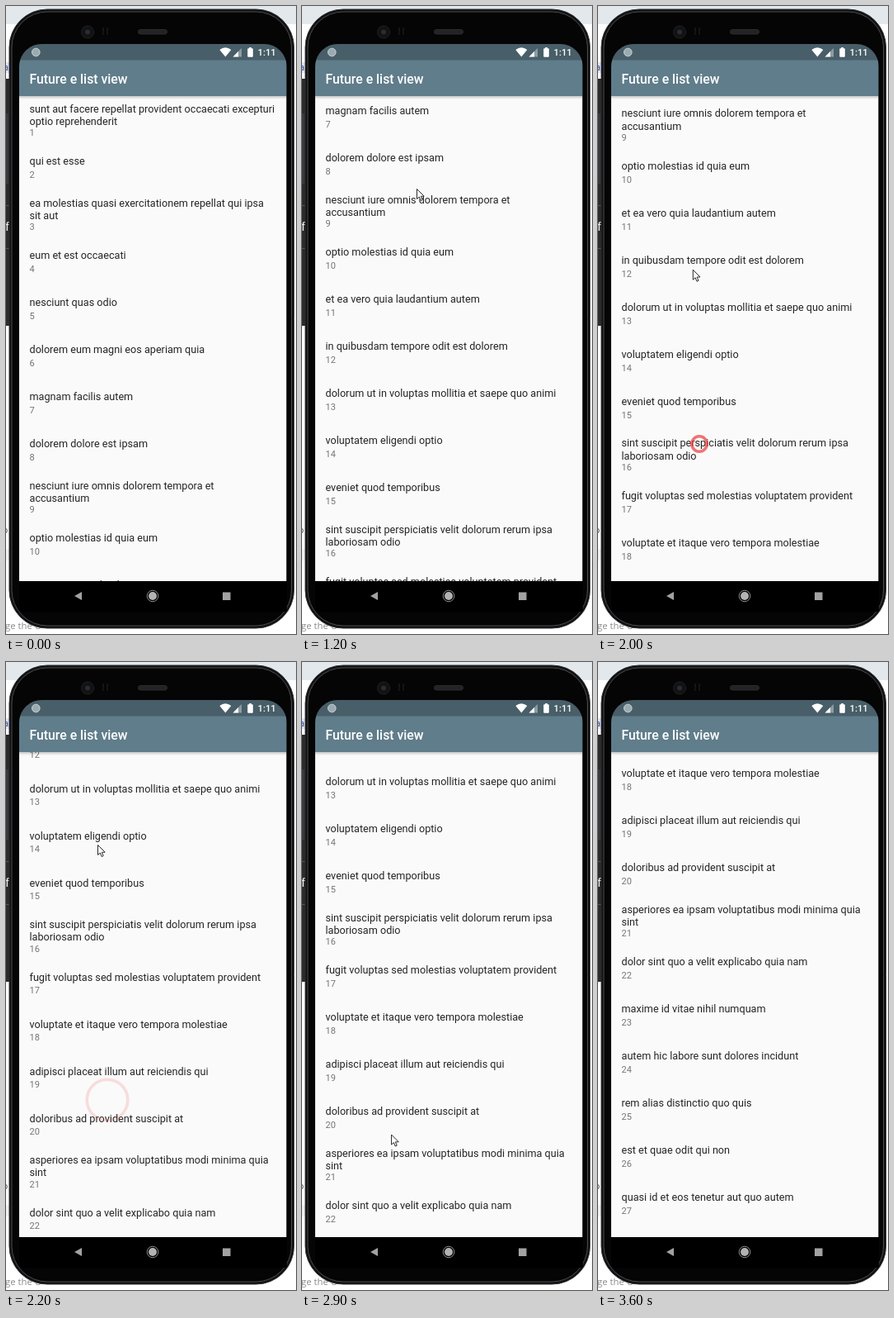
These frames come from a looping animation (352 px wide and 760 px high, 4600 ms). An HTML page with a canvas:

```html
<!DOCTYPE html>
<html lang="en">
<head>
<meta charset="utf-8">
<title>Future list view</title>
<style>
html, body { margin: 0; width: 100%; height: 100%; overflow: hidden; background: #fff; }
canvas { display: block; width: 352px; height: 760px; }
</style>
</head>
<body>
<canvas id="stage"></canvas>
<script>
const W = 352, H = 760, LOOP = 4600, STEP = 100, ENTER = 300, LEAVE = 3600;
const SCREEN = { x: 16, y: 46, list: 109, right: 340.7, bottom: 696, radius: 27 };
const ROW = 57, SCROLL_TIME = 330;
const TITLES = `sunt aut facere repellat provident occaecati excepturi|optio reprehenderit
qui est esse
ea molestias quasi exercitationem repellat qui ipsa|sit aut
eum et est occaecati
nesciunt quas odio
dolorem eum magni eos aperiam quia
magnam facilis autem
dolorem dolore est ipsam
nesciunt iure omnis dolorem tempora et|accusantium
optio molestias id quia eum
et ea vero quia laudantium autem
in quibusdam tempore odit est dolorem
dolorum ut in voluptas mollitia et saepe quo animi
voluptatem eligendi optio
eveniet quod temporibus
sint suscipit perspiciatis velit dolorum rerum ipsa|laboriosam odio
fugit voluptas sed molestias voluptatem provident
voluptate et itaque vero tempora molestiae
adipisci placeat illum aut reiciendis qui
doloribus ad provident suscipit at
asperiores ea ipsam voluptatibus modi minima quia|sint
dolor sint quo a velit explicabo quia nam
maxime id vitae nihil numquam
autem hic labore sunt dolores incidunt
rem alias distinctio quo quis
est et quae odit qui non
quasi id et eos tenetur aut quo autem`.split('\n').map(s => s.split('|'));

// The list follows each press with a short lag
const SWIPES = [
  { press: 700, x: 124, y: 570, scrollAt: 850, distance: 346 },
  { press: 1900, x: 123, y: 530, scrollAt: 1873, distance: 315.5 },
  { press: 2940, x: 108, y: 573, scrollAt: 2867, distance: 303.5 },
];
const MOVES = [
  { from: 300, to: 700, x: 124, y: 570 },
  { from: 800, to: 1180, x: 139, y: 221 },
  { from: 1200, to: 1400, x: 131, y: 690 },
  { from: 1400, to: 1800, x: 123, y: 530 },
  { from: 1850, to: 2090, x: 111, y: 221 },
  { from: 2200, to: 2500, x: 127, y: 470 },
  { from: 2500, to: 2750, x: 108, y: 573 },
  { from: 2890, to: 3140, x: 122, y: 262 },
];

const canvas = document.getElementById('stage');
const ctx = canvas.getContext('2d');
const dpr = window.devicePixelRatio || 1;
canvas.width = W * dpr;
canvas.height = H * dpr;
ctx.scale(dpr, dpr);

function ease(p) {
  p = Math.max(0, Math.min(1, p));
  return p * p * (3 - 2 * p);
}

function scrollAt(t) {
  return SWIPES.reduce((sum, s) => sum + s.distance * ease((t - s.scrollAt) / SCROLL_TIME), 0);
}

function pointerAt(t) {
  return MOVES.reduce((pos, m) => {
    const p = ease((t - m.from) / (m.to - m.from));
    return { x: pos.x + (m.x - pos.x) * p, y: pos.y + (m.y - pos.y) * p };
  }, { x: 0, y: 496 });
}

function paint(fill, stroke, lw = 1) {
  if (fill) { ctx.fillStyle = fill; ctx.fill(); }
  if (stroke) { ctx.strokeStyle = stroke; ctx.lineWidth = lw; ctx.stroke(); }
}

function rect(x, y, w, h, fill) {
  ctx.fillStyle = fill;
  ctx.fillRect(x, y, w, h);
}

function poly(points, ...style) {
  ctx.beginPath();
  points.forEach(([x, y]) => ctx.lineTo(x, y));
  ctx.closePath();
  paint(...style);
}

function round(x, y, w, h, r, ...style) {
  ctx.beginPath();
  ctx.roundRect(x, y, w, h, r);
  paint(...style);
}

function circle(x, y, r, ...style) {
  ctx.beginPath();
  ctx.arc(x, y, r, 0, Math.PI * 2);
  paint(...style);
}

function text(str, x, y, size, fill, weight = 400, family = 'Roboto') {
  ctx.font = `${weight} ${size}px ${family}, sans-serif`;
  ctx.fillStyle = fill;
  ctx.fillText(str, x, y);
}

function drawDesktop() {
  rect(0, 0, W, H, '#fff');
  rect(0, 0, W, 22, '#e3e8ec');
  rect(0, 68, 5, 13, '#dfe5f2');
  text('a', -3, 78, 11, '#3a4a9c');
  rect(0, 88, 5, 299, '#2b2b2b');
  rect(0, 130, 3, 85, '#3a3a3c');
  rect(0, 241, 5, 1, '#555');
  rect(0, 293, 5, 1, '#555');
  text('f', -1, 272, 15, '#eee');
  text('o', -4, 638, 11, '#555');
  rect(0, 657, 5, 14, '#f0f0f0');
  text('ge the C', -1, 754, 11.3, '#8a8a8a', 400, '"Open Sans"');
}

function drawPhone() {
  round(4, 4, 345.5, 749, 46, '#101113', '#2c2d2f');
  round(7, 7, 339.5, 743, 43, '#050506', '#4b4c4f');
  circle(99, 31.5, 7.5, '#111214', '#202124');
  circle(99, 31.5, 3, '#2a2c32');
  rect(117, 26, 2, 9, '#141416');
  rect(122, 26, 2, 9, '#141416');
  round(160.5, 28.5, 35, 5.5, 2.7, '#222325', '#303133', 0.8);
  rect(SCREEN.x, SCREEN.bottom, SCREEN.right - SCREEN.x, 37, '#000');

  poly([[83, 714], [92, 709], [92, 719]], '#a2a2a2');
  circle(178, 714, 5, '#b2b2b2');
  circle(178, 714, 6.8, null, '#8f8f8f');
  rect(263, 709.5, 9.5, 9.5, '#a2a2a2');
}

function drawStatus() {
  circle(36.3, 56, 4.8, '#9babb2', '#c6d0d4');
  ctx.beginPath();
  ctx.moveTo(266.3, 61.5);
  ctx.lineTo(259.3, 53);
  ctx.quadraticCurveTo(266.3, 47.7, 273.3, 53);
  ctx.closePath();
  paint('#fff');
  poly([[286, 51], [286, 61.5], [275.5, 61.5]], '#8d9ca3');
  poly([[282, 55], [282, 61.5], [275.5, 61.5]], '#fff');
  round(293.2, 51.3, 6.6, 10.4, 1, '#fff');
  rect(295.2, 50, 2.6, 2, '#fff');
  text('1:11', 305.6, 60, 11.2, '#fff', 500);
}

function drawList(scroll) {
  const { x, list, right, bottom } = SCREEN, w = right - x;
  ctx.save();
  ctx.beginPath();
  ctx.rect(x, list, w, bottom - list);
  ctx.clip();
  rect(x, list, w, bottom - list, '#fafafa');
  TITLES.forEach((lines, i) => {
    const y = 109.5 + i * ROW - scroll;
    if (y < list - ROW || y > bottom) return;
    const wrapped = lines.length > 1;
    lines.forEach((line, n) =>
      text(line, 28.5, y + (wrapped ? 19.2 : 25.5) + n * 15.1, 12.65, '#252525'));
    text(i + 1, 28.5, y + (wrapped ? 47.8 : 41.3), 11.06, '#757575');
  });
  const shade = ctx.createLinearGradient(0, list, 0, list + 4);
  shade.addColorStop(0, 'rgba(0,0,0,.2)');
  shade.addColorStop(1, 'rgba(0,0,0,0)');
  rect(x, list, w, 4, shade);
  ctx.restore();
}

function drawScreen(scroll) {
  const { x, y, list, right, bottom, radius } = SCREEN, w = right - x;
  ctx.save();
  ctx.beginPath();
  ctx.roundRect(x, y, w, bottom - y, [radius, radius, 0, 0]);
  ctx.clip();
  rect(x, y, w, 20, '#485e68');
  rect(x, 65.5, w, list - 65.5, '#607d8b');
  drawStatus();
  text('Future e list view', 28.5, 93.5, 15.8, '#fff', 500);
  drawList(scroll);
  ctx.restore();
}

function drawPresses(t) {
  for (const { press, x, y } of SWIPES) {
    const age = (t - press) / 1000, alpha = 1 - 2.8 * age;
    if (age < 0 || alpha <= 0) continue;
    circle(x, y, 1.4 + 78 * age, null, `rgba(236,62,62,${alpha})`, 3.6);
  }
}

function drawPointer(t) {
  if (t < ENTER || t >= LEAVE) return;
  const { x, y } = pointerAt(t);
  ctx.save();
  ctx.translate(x, y);
  poly([[0.5, 0.5], [0.5, 12.5], [3.3, 10], [5.2, 14.5], [7.2, 13.6], [5.3, 9.3], [9.2, 9.2]],
    '#fff', '#2a2a2a');
  ctx.restore();
}

function draw(t) {
  drawDesktop();
  drawPhone();
  drawScreen(scrollAt(t));
  drawPresses(t);
  drawPointer(t);
}

const start = performance.now();
function tick() {
  const t = (performance.now() - start) % LOOP;
  draw(Math.min(LEAVE, Math.floor(t / STEP) * STEP));
  requestAnimationFrame(tick);
}
tick();
</script>
</body>
</html>
```
